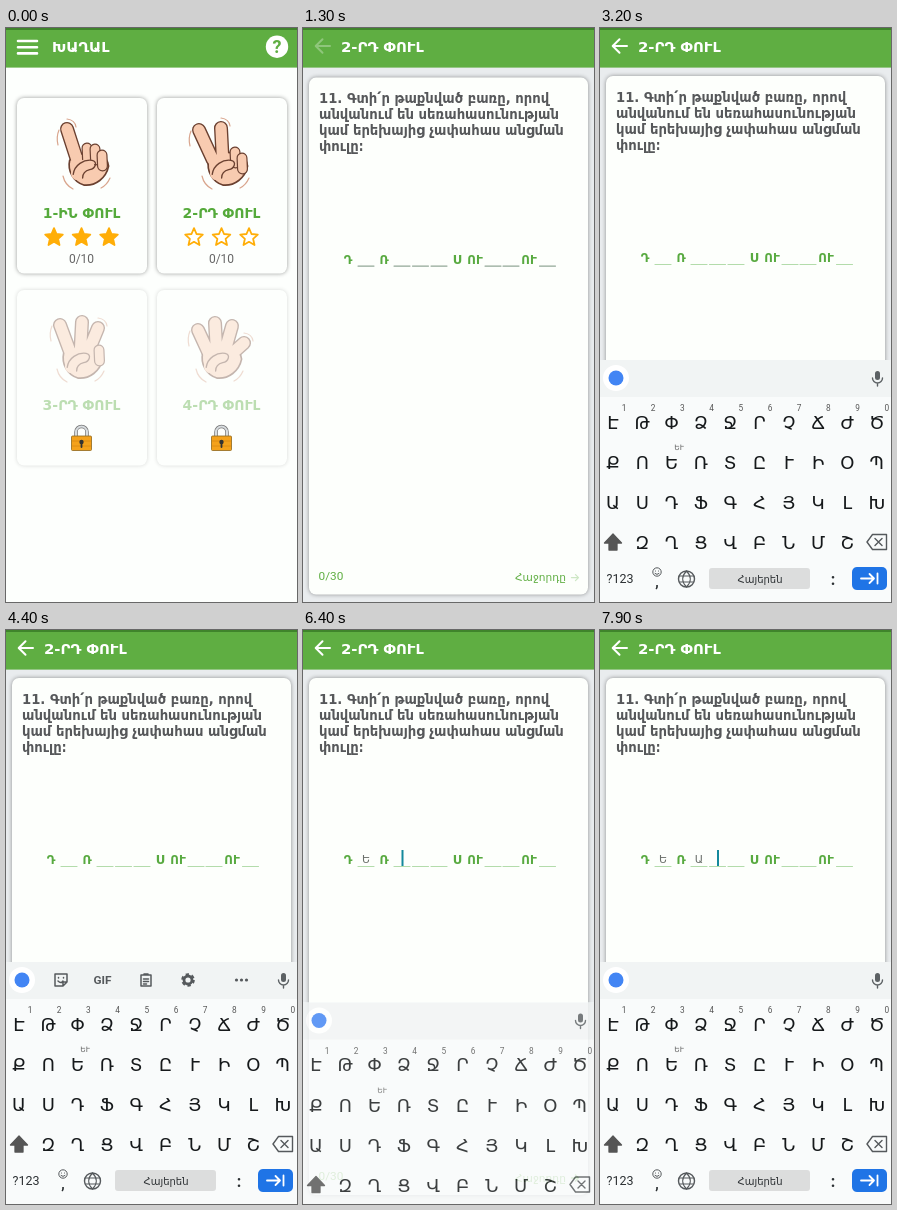
Recreate the animation shown at these times as an HTML page. Size 291 by 574 pixels, loop 8 s.

```html
<!DOCTYPE html>
<html lang="hy">
<head>
<meta charset="utf-8">
<style>
html, body { margin: 0; width: 100%; height: 100%; overflow: hidden; background: #fdfffd; }
svg { display: block; width: 100%; height: 100%; }
text { font-family: "DejaVu Sans", sans-serif; }
.b { font-weight: bold; }
.r { font-family: Roboto, sans-serif; }
.m { text-anchor: middle; }
.line { fill: none; stroke-linecap: round; stroke-linejoin: round; }
.card { filter: drop-shadow(0 .5px 2px #0006); }
</style>
</head>
<body>
<svg id="stage" viewBox="0 0 291 574"></svg>
<script>
const GREEN = '#5fae42', INK = '#56585a', KEY = '#16191b', ICON = '#55595c';
const LOOP = 8000;
const stage = document.getElementById('stage');

const text = (x, y, size, fill, str, cls = '', extra = '') =>
  `<text x="${x}" y="${y}" font-size="${size}" fill="${fill}" class="${cls}" ${extra}>${str}</text>`;
const rect = (x, y, w, h, fill, r = 0, extra = '') =>
  `<rect x="${x}" y="${y}" width="${w}" height="${h}" rx="${r}" fill="${fill}" ${extra}/>`;
const line = (d, color, w = 1.5, extra = '') =>
  `<path class="line" d="${d}" stroke="${color}" stroke-width="${w}" ${extra}/>`;
const circle = (x, y, r, fill, extra = '') =>
  `<circle cx="${x}" cy="${y}" r="${r}" fill="${fill}" ${extra}/>`;
const group = (id, body) => `<g id="${id}">${body}</g>`;

const header = (x, title) =>
  rect(0, 0, 291, 39.6, GREEN) + rect(0, 0, 291, 2, '#3f842b') +
  text(x, 24, 14.9, '#fff', title, 'b');

// Menu

function star(x, y, full) {
  const pts = [...Array(10)].map((_, i) => {
    const a = i * Math.PI / 5, r = i % 2 ? 4.3 : 9.3;
    return [x + r * Math.sin(a), y - r * Math.cos(a)].map(v => v.toFixed(1));
  });
  return `<polygon points="${pts.join(' ')}" fill="${full ? '#ffae08' : '#fff'}"
    stroke="#ffae08" stroke-width="1.8" stroke-linejoin="round"/>`;
}

// Coordinates are relative to the palm centre.
function hand(x, y, tips, folds) {
  const skin = '#f8cbb0', dark = '#6a4030';
  const fingers = tips.map(([tx, ty]) => `M${tx * .45} ${ty * .15}L${tx} ${ty}`).join('');
  const palm = 'M-13 -4C-15 5 -10 14 -1 17C9 18 18 11 20 1C19 -9 6 -12 -2 -10Z';
  const [lx, ly] = tips[0], [rx, ry] = tips[tips.length - 1];
  return `<g transform="translate(${x} ${y})">` +
    line(fingers, dark, 14) +
    `<path d="${palm}" transform="scale(1.18)" fill="${skin}" stroke="${dark}" stroke-width="1.4"/>` +
    line(fingers, skin, 11.3) +
    folds.map(([fx, fy]) => {
      const d = `M${fx} ${fy}l.5 11`;
      return line(d, dark, 11) + line(d, skin, 8.6);
    }).join('') +
    `<g transform="scale(1.18)"><ellipse cx="-2" cy="4" rx="11" ry="7.5" transform="rotate(-38 -2 4)" fill="${skin}"/>` +
    line('M-10 8C-9 0 -1 -5 6 -4C11 -3 9 3 4 4C0 5 -2 8 -2 11', dark, 1.1) + '</g>' +
    line(`M${lx - 9} ${ly + 16}q-2 -8 1 -15M${rx} ${ry - 10}q8 1 9 8M-22 11q2 9 10 13M25 13q-3 7 -9 10`, '#d9a58d', 1.2) +
    '</g>';
}

const lock = (x, y) => {
  const shackle = `M${x - 5.5} ${y}v-6a5.5 5.5 0 0 1 11 0v6`;
  return line(shackle, '#777', 3.5) + line(shackle, '#d8dde0', 2) +
    rect(x - 10, y - 2, 20, 14.5, '#f5a21b', 1, 'stroke="#8e671c" stroke-width=".8"') +
    line(`M${x - 9} ${y + 3}h18m-18 5h18`, '#d98814', .8) +
    circle(x, y + 4, 2.2, '#333') + line(`M${x} ${y + 5}v4`, '#333', 1.8);
};

function level(x, y, name, picture, stars) {
  const locked = stars === undefined;
  const cx = x + 64.5;
  const body = rect(x, y, 130, 175.5, '#fdfffd', 7, 'class="card"') + picture +
    text(cx, y + 120, 14, '#55aa3b', name, 'b m');
  if (locked) return `<g opacity=".38">${body}</g>` + lock(cx, y + 148);
  return body + [-27.5, 0, 27.5].map(d => star(cx + d, y + 139.5, stars)).join('') +
    text(cx, y + 165, 12, '#666', '0/10', 'r m');
}

const menu = rect(0, 0, 291, 574, '#fdfffd') + header(46, 'ԽԱՂԱԼ') +
  line('M12 13h19M12 19.2h19M12 25.4h19', '#fff', 2.6) +
  circle(271, 18.7, 11.2, '#fff') + text(271, 25, 18, GREEN, '?', 'r b m') +
  level(11, 70, '1-ԻՆ ՓՈՒԼ', hand(79, 137, [[-18, -36]], [[2, -17], [10, -16], [17, -10]]), true) +
  level(151, 70, '2-ՐԴ ՓՈՒԼ', hand(218, 137, [[-25, -35], [-3, -37]], [[11, -13], [18, -7]]), false) +
  level(11, 262, '3-ՐԴ ՓՈՒԼ', hand(73, 330, [[-19, -33], [3, -36], [19, -30]], [[20, -8]])) +
  level(151, 262, '4-ՐԴ ՓՈՒԼ', hand(212, 330, [[-20, -28], [-3, -35], [14, -32], [26, -15]], []));

// Question

const question = ['11. Գտի՛ր թաքնված բառը, որով', 'անվանում են սեռահասունության',
  'կամ երեխայից չափահաս անցման', 'փուլը։'];
const given = [[45, 'Դ'], [81, 'Ռ'], [154, 'Ս'], [172, 'ՈՒ'], [226, 'ՈՒ']];
const blanks = [55, 91, 109.5, 128, 182, 200, 236.5];

const quiz = rect(0, 0, 291, 574, '#e9ecee') +
  group('content',
    rect(6, 48, 279, 517, '#fdfffc', 7, 'class="card"') +
    question.map((s, i) => text(16, 73.8 + 16 * i, 13.2, INK, s, 'b')).join('') +
    given.map(([x, s]) => text(x, 234, 11.8, '#58aa40', s, 'b m')).join('') +
    line(blanks.map(x => `M${x} 236.5h16`).join(''), '#b3dcab', 1.2, 'id="blanks"') +
    text(63, 233, 11, '#6b706b', 'Ե', 'm', 'id="typed0"') +
    text(99, 233, 11, '#6b706b', 'Ա', 'm', 'id="typed1"') +
    rect(0, 220, 2, 16, '#14899c', 0, 'id="caret"') +
    text(15.5, 550, 11.8, GREEN, '0/30', 'r') +
    text(212, 551.5, 10.6, GREEN, 'Հաջորդը') +
    line('M268.5 548h7m-3 -3l3 3l-3 3', GREEN, 1.3, 'id="next"')) +
  header(38, '2-ՐԴ ՓՈՒԼ') +
  line('M27 18H13m6.5 -6.8L12.7 18l6.8 6.8', '#fff', 2, 'id="back"');

// Keyboard

const rows = ['ԷԹՓՁՋՐՉՃԺԾ', 'ՔՈԵՌՏԸՒԻՕՊ', 'ԱՍԴՖԳՀՅԿԼԽ', ' ԶՂՑՎԲՆՄՇ'];
const shiftKey = 'M13 506l-8.5 9h4.5v7h8v-7h4.5z';

const keys = (id, cased, hint, shiftFill) => group(id,
  rows.map((row, j) => [...row].map((c, i) =>
    text(13 + 29.3 * i, 400.8 + 40.2 * j, 18, KEY, cased(c), 'm')).join('')).join('') +
  text(79, 422, 7.5, '#666', hint, 'm') +
  `<path d="${shiftKey}" fill="${shiftFill}" stroke="#555" stroke-width="1.3" stroke-linejoin="round"/>`);

const tools = group('tools',
  line('M49 344h12v8l-4 4h-8zM61 352h-4v4M52.5 347.5v.5m5 -.5v.5M52 351q3 3 5 0', ICON, 1.5) +
  text(96.5, 354, 11.8, ICON, 'GIF', 'r b m') +
  line('M135 345h10v11h-10zM138 344h4M137.5 349h5m-5 2.5h5m-5 2.5h3', ICON, 1.5) +
  circle(182, 350, 4, 'none', `stroke="${ICON}" stroke-width="2.8"`) +
  circle(182, 350, 5.8, 'none', `stroke="${ICON}" stroke-width="2" stroke-dasharray="3.3 2.77"`) +
  [230.5, 235.5, 240.5].map(x => circle(x, 350, 1.6, ICON)).join(''));

const hints = group('hints',
  [[65, 'Ե'], [144, 'Ես'], [223, 'Եմ']].map(([x, s]) => text(x, 355, 13, '#4b5053', s, 'm')).join('') +
  line('M103 341v19M186.5 341v19', '#d3d7da', 1));

const keyboard = rect(0, 332, 291, 242, '#f9fbfb') + rect(0, 332, 291, 37, '#f1f4f4') +
  circle(16, 350, 13, '#fff') + circle(16, 350, 7.5, '#4285f4') + tools + hints +
  rect(275, 343, 5, 9, '#5c6164', 2.5) + line('M272.5 350a5 5 0 0 0 10 0M277.5 355v3', '#5c6164', 1.4) +
  [...'1234567890'].map((c, i) => text(24 + 29.2 * i, 383, 8.3, '#555', c, 'r m')).join('') +
  keys('upper', c => c, 'ԵՒ', '#555') +
  keys('lower', c => c.toLowerCase(), 'և', 'none') +
  line('M267 514l5.5 -7.5h14v15h-14zM275 510.5l7 7m0 -7l-7 7', ICON, 1.4) +
  text(6.5, 555, 12.5, '#2c3033', '?123', 'r') +
  circle(57, 544, 4.2, 'none', `stroke="${ICON}"`) +
  line('M55.5 543v.1m3 -.1v.1M55 545.5q2 2 4 0', ICON, 1) +
  text(57, 559, 14, '#2c3033', ',', 'r b m') +
  circle(86.5, 551, 8, 'none', `stroke="${ICON}" stroke-width="1.4"`) +
  line('M79.5 548h14m-14 6h14M86.5 543c-5 5 -5 11 0 16c5 -5 5 -11 0 -16', ICON, 1.2) +
  rect(109, 540, 101, 21, '#dcdddd', 3) + text(160, 555, 10, '#2c3033', 'Հայերեն', 'm') +
  text(233, 557, 16, '#2c3033', ':', 'r b m') +
  rect(252, 539, 35, 23, '#1f74e6', 5) +
  line('M261 550.5h13m-4.5 -4.5l4.5 4.5l-4.5 4.5M277.5 545.5v10', '#fff', 1.8);

stage.innerHTML = menu + group('quiz', quiz) + group('keyboard', keyboard);

// Motion

const set = (id, name, value) => document.getElementById(id).setAttribute(name, value);
const show = (id, on) => set(id, 'visibility', on ? 'visible' : 'hidden');
const ramp = (t, start, length) => Math.min(1, Math.max(0, (t - start) / length));
const within = (t, a, b) => t >= a && t < b;

const OPEN = 1130, TYPE_1 = 4900, HIDE = 5350, TYPE_2 = 7500;
const focus = [[2600, TYPE_1, 62.5], [6100, TYPE_2, 98.5], [TYPE_2, LOOP, 117]];

function keyboardShown(t) {
  const rise = start => 1 - (1 - ramp(t, start, 225)) ** 3;
  if (t < HIDE) return rise(2900);
  return t < 6300 ? 1 - ramp(t, HIDE, 200) ** 2.5 : rise(6300);
}

function draw() {
  const t = performance.now() % LOOP;

  set('quiz', 'opacity', ramp(t, OPEN, 170));
  set('content', 'transform', `translate(0 ${46 * (1 - ramp(t, OPEN, 350)) ** 5})`);
  const late = .3 + .7 * ramp(t, 1350, 150);
  set('back', 'opacity', late);
  set('next', 'opacity', late);
  set('blanks', 'stroke', t < 1450 ? '#93a898' : '#b3dcab');

  const caret = focus.find(([a, b]) => within(t, a, b));
  show('caret', caret && (t - caret[0]) % 1000 < 500);
  if (caret) set('caret', 'x', caret[2]);
  show('typed0', t >= TYPE_1);
  show('typed1', t >= TYPE_2);

  const p = keyboardShown(t), lower = within(t, TYPE_1, 5600);
  set('keyboard', 'opacity', p);
  set('keyboard', 'transform', `translate(0 ${242 * (1 - p)})`);
  show('upper', !lower);
  show('lower', lower);
  show('hints', lower);
  show('tools', within(t, 3300, TYPE_1) || within(t, 6800, TYPE_2));

  requestAnimationFrame(draw);
}
draw();
</script>
</body>
</html>
```
